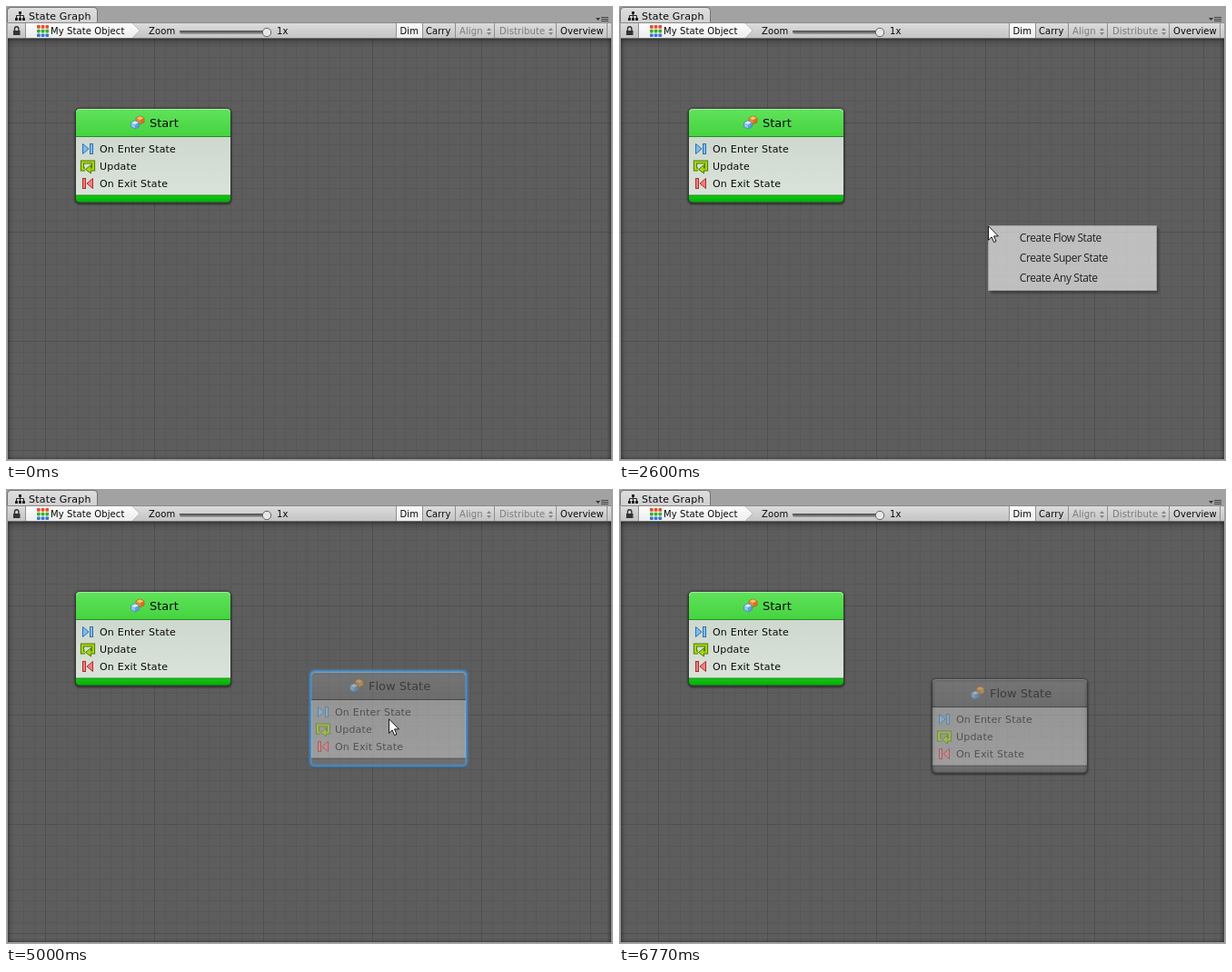
Animation, 668 px wide and 500 px high, one loop 7.26 s. Source, as an HTML page:

```html
<!DOCTYPE html>
<html lang="en">
<head>
<meta charset="utf-8">
<title>State graph</title>
<style>
  html, body { margin: 0; width: 100%; height: 100%; overflow: hidden; background: #a2a2a2; }
  svg { display: block; width: 668px; height: 500px; }
  text { font: 11px "DejaVu Sans", sans-serif; letter-spacing: .2px; fill: #080808; white-space: pre; }
  .bar text { font-size: 10px; letter-spacing: .1px; }
  .bar .off { fill: #7b7b7b; }
  .title { font-size: 13px; letter-spacing: 0; }
  .menu text { font: 12px "Open Sans", "Noto Sans", sans-serif; letter-spacing: -.4px; fill: #000; }
  .dim > * { opacity: .5; }
  .dim > .glow { opacity: 1; }
</style>
</head>
<body>
<svg id="stage" viewBox="0 0 668 500" xmlns="http://www.w3.org/2000/svg"></svg>
<script>
const LOOP = 7260;
const FRAME = 1000 / 30;

const gradient = (id, top, bottom) =>
  `<linearGradient id="${id}" x2="0" y2="1"><stop stop-color="${top}"/><stop offset="1" stop-color="${bottom}"/></linearGradient>`;
const rect = (x, y, w, h, fill, more = '') =>
  `<rect x="${x}" y="${y}" width="${w}" height="${h}" fill="${fill}" ${more}/>`;
const path = (d, fill, more = '') => `<path d="${d}" fill="${fill}" ${more}/>`;
const label = (x, y, text, cls = '') => `<text x="${x}" y="${y}" class="${cls}">${text}</text>`;

const defs = `<defs>
  ${gradient('tab', '#dedede', '#cfcfcf')}
  ${gradient('bar', '#dedede', '#c2c2c2')}
  ${gradient('crumb', '#fdfdfd', '#ececec')}
  ${gradient('greenHead', '#60e25b', '#45d440')}
  ${gradient('greenBody', '#cfd8cf', '#dae3da')}
  ${gradient('greenFoot', '#12c712', '#04ad08')}
  ${gradient('greyHead', '#8d8d8d', '#7d7d7d')}
  ${gradient('greyBody', '#cecece', '#dedede')}
  ${gradient('greyFoot', '#858585', '#757575')}
  <linearGradient id="topShade" x2="0" y2="1"><stop stop-opacity=".42"/><stop offset=".35" stop-opacity=".15"/><stop offset="1" stop-opacity="0"/></linearGradient>
  <linearGradient id="sideShade"><stop stop-opacity=".3"/><stop offset="1" stop-opacity="0"/></linearGradient>
  <pattern id="minor" x="7" y="8" width="12" height="12" patternUnits="userSpaceOnUse">
    ${path('M0 0H12V1H1V12H0Z', '#575757')}
  </pattern>
  <pattern id="major" x="43" y="8" width="120" height="120" patternUnits="userSpaceOnUse">
    ${path('M0 0H120V1H1V120H0Z', '#4f4f4f')}
  </pattern>
  <filter id="soft" x="-10%" y="-10%" width="120%" height="120%"><feGaussianBlur stdDeviation="1.3"/></filter>
</defs>`;

function canvasArea() {
  const area = fill => rect(2, 36, 664, 462, fill);
  return area('#5d5d5d') + area('url(#minor)') + area('url(#major)')
    + rect(2, 36, 664, 9, 'url(#topShade)')
    + rect(2, 36, 5, 462, 'url(#sideShade)')
    + rect(-666, 36, 5, 462, 'url(#sideShade)', 'transform="scale(-1 1)"')
    + rect(2, -498, 664, 5, 'url(#topShade)', 'transform="scale(1 -1)" opacity=".6"');
}

function tabStrip() {
  const tree = path('M14 6h3v3h-3zM10 13h3v3h-3zM14 13h3v3h-3zM18 13h3v3h-3z', '#222')
    + path('M15.5 9v4M11.5 13v-2.5h8V13', 'none', 'stroke="#222"');
  return rect(0, 0, 668, 500, '#a2a2a2')
    + path('M2 19V5a3 3 0 0 1 3-3h92a3 3 0 0 1 3 3v14z', 'url(#tab)')
    + path('M1.500 18V5a3.500 3.500 0 0 1 3.500-3.500h92a3.500 3.500 0 0 1 3.500 3.500v13', 'none', 'stroke="#737373"')
    + tree + label(25, 15, 'State Graph', 'tabname')
    + path('M649 13h5l-2.500 3z', '#333')
    + path('M655 12.500h8M655 14.500h8M655 16.500h8', 'none', 'stroke="#444"');
}

function toolbar() {
  const rows = ['#e8502c', '#3fae2e', '#3579cf'];
  let dots = '';
  rows.forEach((color, r) => {
    for (let c = 0; c < 3; c++) dots += rect(34 + c * 4.7, 21 + r * 4.7, 3.7, 3.7, color, 'rx=".8"');
  });
  const divider = x => rect(x, 19, 1, 16, '#8f8f8f');
  const updown = x => path(`M${x} 27l2.500-3 2.500 3zM${x} 29l2.500 3 2.500-3z`, '#858585');
  return `<g class="bar">`
    + rect(2, 18, 664, 18, 'url(#bar)') + rect(2, 18, 664, 1, '#8a8a8a') + rect(2, 35, 664, 1, '#6a6a6a')
    + path('M9.500 27v-2a2.200 2.200 0 0 1 4.400 0v2', 'none', 'stroke="#333" stroke-width="1.400"')
    + rect(8, 27, 7.500, 5, '#333') + divider(21)
    + path('M22 19H139L147 27 139 35H22Z', 'url(#crumb)')
    + path('M139 19L147 27 139 35', 'none', 'stroke="#b5b5b5" stroke-width=".8"')
    + dots + label(49, 31, 'My State Object') + label(157, 31, 'Zoom')
    + rect(191, 27, 96, 3.500, '#777', 'rx="1.700"') + rect(191, 27, 96, 1.200, '#4e4e4e', 'rx=".6"')
    + '<circle cx="287" cy="29" r="4.700" fill="#e6e6e6" stroke="#626262"/>'
    + label(298, 31, '1x')
    + rect(430, 19, 28, 16, 'url(#crumb)')
    + [429, 458, 494, 537, 605, 661].map(divider).join('')
    + label(433.500, 31, 'Dim') + label(462, 31, 'Carry')
    + label(499, 31, 'Align', 'off') + updown(529)
    + label(543, 31, 'Distribute', 'off') + updown(597)
    + label(610, 31, 'Overview') + '</g>';
}

function cube(x, y, top, left, right, edge) {
  return path(`M${x} ${y}l4.500-2.200 4.500 2.200-4.500 2.200z`, top)
    + path(`M${x} ${y}l4.500 2.200v4.800l-4.500-2.200z`, left)
    + path(`M${x + 9} ${y}l-4.500 2.200v4.800l4.500-2.200z`, right)
    + path(`M${x} ${y}l4.500-2.200 4.500 2.200v4.800l-4.500 2.200-4.500-2.200z`, 'none', `stroke="${edge}" stroke-width=".8"`);
}

const blocks = (x, accent) => '<g>'
  + cube(x + 6, 123, '#ffc27a', '#f08a2c', accent, '#b5611b')
  + cube(x + .5, 128, '#d4ecff', '#8fc6f2', '#5f9fdc', '#4a84bd') + '</g>';

const skip = (bar, tip, base, fill, edge) =>
  path(`M${base} 151.500V162.500L${tip} 157Z`, fill, `stroke="${edge}"`) + rect(bar, 151.500, 3, 11, fill, `stroke="${edge}"`);

const eventIcons = [
  `<g>${skip(92.500, 91, 84.500, '#7fbdf0', '#2f6fae')}</g>`,
  '<g>' + path('M87 179.500H84V171.500H96V179.500H92', 'none', 'stroke="#4f7a00" stroke-width="4.200"')
    + path('M93.500 174.800V184L87.500 179.500Z', '#a5d610', 'stroke="#4f7a00"')
    + path('M87 179.500H84V171.500H96V179.500H92', 'none', 'stroke="#a5d610" stroke-width="2.200"') + '</g>',
  `<g transform="translate(0 38)">${skip(84.500, 89, 95.500, '#f08080', '#b02a2a')}</g>`
].join('');

function node({ id = '', cls = '', tone, title, iconX, accent, line, glow = '' }) {
  const outline = more => `<rect x="77" y="113" width="170" height="103" rx="4" fill="none" ${more}/>`;
  return `<g id="${id}" class="${cls}">`
    + outline('stroke="#000" stroke-width="2.500" opacity=".6" filter="url(#soft)" transform="translate(0 .8)"')
    + glow
    + path('M77 143V117a4 4 0 0 1 4-4h162a4 4 0 0 1 4 4v26z', `url(#${tone}Head)`)
    + path('M77.500 117a3.500 3.500 0 0 1 3.500-3.500h162a3.500 3.500 0 0 1 3.500 3.500', 'none', 'stroke="#fff" stroke-opacity=".4"')
    + rect(77, 143, 170, 1, line) + rect(77, 144, 170, 64, `url(#${tone}Body)`)
    + path('M77 208h170v3.500a4 4 0 0 1-4 4h-162a4 4 0 0 1-4-4z', `url(#${tone}Foot)`)
    + rect(77, 207.500, 170, 1, line)
    + blocks(iconX, accent) + label(iconX + 21, 133, title, 'title') + eventIcons
    + label(103, 161, 'On Enter State') + label(103, 180, 'Update') + label(103, 199, 'On Exit State')
    + '</g>';
}

const glow = '<g id="glow" class="glow">'
  + '<rect x="76.500" y="112.500" width="171" height="103.500" rx="4" fill="none" stroke="#4797dc" stroke-width="3" filter="url(#soft)"/>'
  + '<rect x="76.500" y="112.500" width="171" height="103.500" rx="4" fill="none" stroke="#5b93c2" stroke-opacity=".65"/></g>';

const menu = '<g id="menu" class="menu">'
  + rect(409, 244, 185, 72, '#000', 'opacity=".45" filter="url(#soft)"')
  + rect(406.500, 241.500, 185, 71, '#f0f0f0', 'stroke="#c4c4c4"')
  + ['Flow', 'Super', 'Any'].map((kind, i) => label(440.800, 259 + 22 * i, `Create ${kind} State`)).join('') + '</g>'
  + '<g id="picked" class="menu">' + rect(409, 244, 180, 22, '#91c9f7') + label(440.800, 259, 'Create Flow State') + '</g>';

const pointer = path('M.5.8V16.300L4.100 12.900 6.600 18.600 9 17.500 6.500 11.900H11.400Z', '#fff', 'id="pointer" stroke="#000" stroke-width=".9"');

const stage = document.getElementById('stage');
stage.innerHTML = defs + tabStrip() + canvasArea() + toolbar()
  + node({ tone: 'green', title: 'Start', iconX: 137, accent: '#e0701c', line: '#1f8f1f' })
  + node({ id: 'flow', cls: 'dim', tone: 'grey', title: 'Flow State', iconX: 119, accent: '#d8b52a', line: '#333', glow })
  + menu + pointer;

const part = Object.fromEntries(['flow', 'glow', 'menu', 'picked', 'pointer'].map(id => [id, document.getElementById(id)]));

const linear = p => p;
const easeOut = p => 1 - (1 - p) ** 2;
const easeBoth = p => p * p * (3 - 2 * p);
const progress = (t, from, to) => Math.min(1, Math.max(0, (t - from) / (to - from)));

// Each move: start, end, target x, target y, easing.
const moves = [
  [1033, 1433, 299, 364, linear],
  [1433, 1733, 372, 270, linear],
  [1733, 2000, 406, 241, easeOut],
  [2900, 3167, 420, 252, easeBoth],
  [4467, 4567, 421, 252, linear],
  [4967, 5233, 428, 260, easeBoth],
  [5400, 6000, 77, 468, easeBoth],
  [6500, 6767, 57, 500, easeBoth]
];

function pointerAt(t) {
  let x = 212, y = 488;
  for (const [from, to, toX, toY, ease] of moves) {
    if (t < from) break;
    const p = ease(progress(t, from, to));
    x += (toX - x) * p;
    y += (toY - y) * p;
  }
  return [Math.round(x), Math.round(y)];
}

const place = (el, x, y) => el.setAttribute('transform', `translate(${x} ${y})`);
const fade = (el, opacity) => {
  el.style.display = opacity > 0 ? '' : 'none';
  el.style.opacity = opacity;
};

function render(ms) {
  const t = Math.floor((ms + 5) / FRAME) * FRAME + .5;
  place(part.pointer, ...pointerAt(t));
  fade(part.pointer, t >= 1033 && t < 6766 ? 1 : 0);

  fade(part.menu, t < 4366 ? progress(t, 2467, 2667) : 0);
  fade(part.picked, t >= 2966 ? 1 - progress(t, 4366, 4833) : 0);

  const drag = easeBoth(progress(t, 4967, 5233));
  place(part.flow, 259 + Math.round(9 * drag), 88 + Math.round(8 * drag));
  part.flow.style.display = t >= 4433 ? '' : 'none';
  part.glow.style.display = t < 6200 ? '' : 'none';
}

const begin = performance.now();
function tick() {
  render((performance.now() - begin) % LOOP);
  requestAnimationFrame(tick);
}
tick();
</script>
</body>
</html>
```
